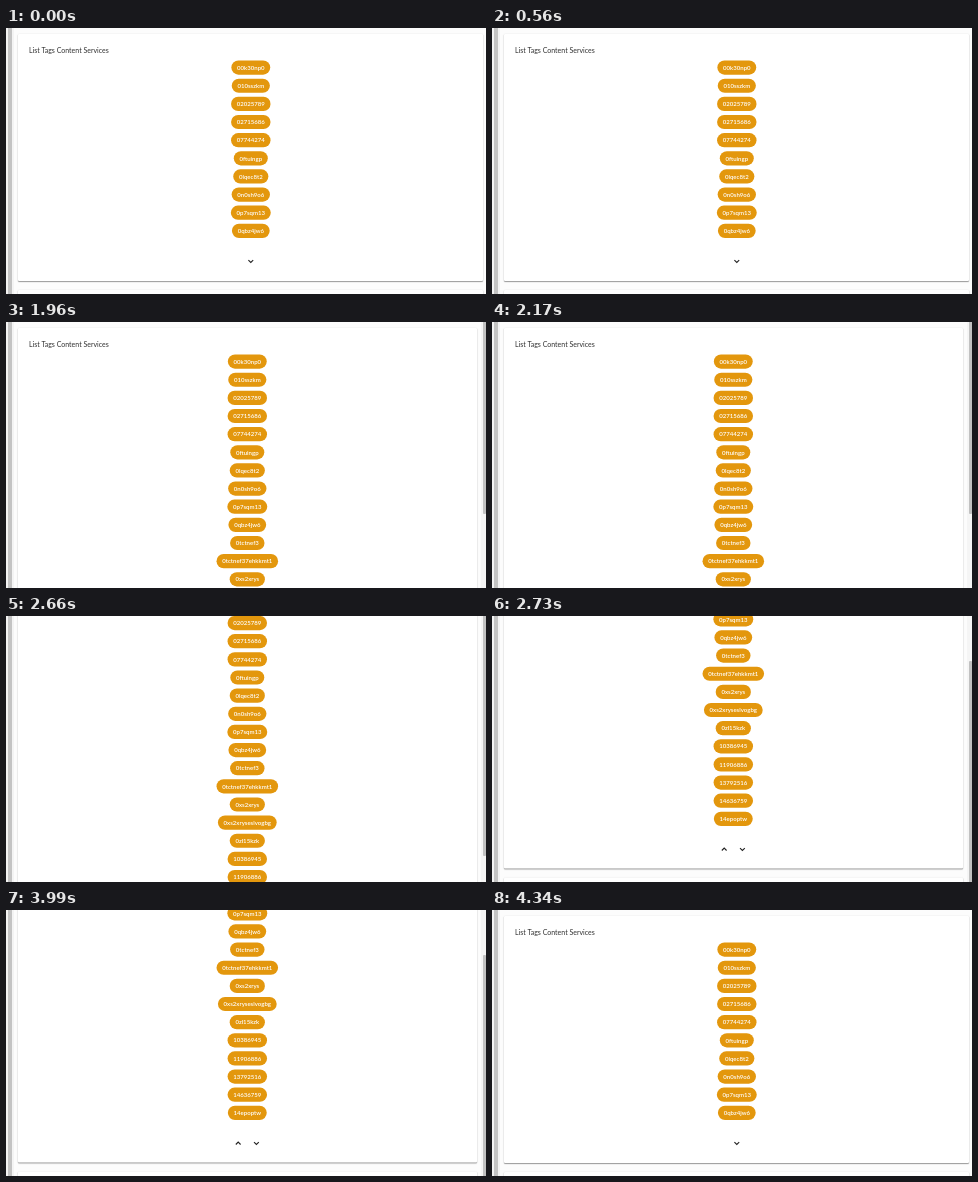
These frames come from a looping animation (480 px wide and 266 px high, 6.09 s). An HTML page:

```html
<!DOCTYPE html>
<html lang="en">
<head>
<meta charset="utf-8">
<title>Tag list</title>
<style>
  html, body { margin: 0; width: 100%; height: 100%; overflow: hidden; background: #fcfcfc; }
  #stage { position: relative; width: 480px; height: 266px; overflow: hidden; }
  #stage div, svg { position: absolute; }
  #page { left: 0; top: 0; width: 480px; height: 266px; }
  .card {
    left: 12px; background: #fff; border-radius: 1px;
    box-shadow: 0 1px 1px rgba(0,0,0,.3), 0 .5px 1.5px rgba(0,0,0,.22);
  }
  #rail { left: 0; top: 0; width: 8px; height: 266px; background: #f3f3f3; }
  #rail div { left: 2px; width: 4px; height: 266px; background: #c3c3c3; }
  #track { left: 475px; top: 0; width: 5px; height: 266px; background: #f5f5f5; }
  #thumb { left: 2px; width: 3px; height: 274px; background: #c1c1c1; border-radius: 1px; }
  svg { left: 0; top: 0; overflow: visible; }
  text { font-family: Lato, "Open Sans", sans-serif; }
  .title { font-size: 7px; fill: #303030; }
  .chip text { font-size: 6.05px; font-weight: 600; fill: #fff; text-anchor: middle; }
  .chip rect { fill: #e3970d; }
  .arrow { fill: none; stroke-width: 1.1; }
</style>
</head>
<body>
<div id="stage">
  <div id="page">
    <div class="card" id="list"></div>
    <div class="card" id="next"></div>
    <svg id="art" width="480" height="266">
      <text class="title" x="23" y="24.6">List Tags Content Services</text>
      <g id="chips"></g>
      <g id="pager">
        <circle id="ripple" cy="232.8"/>
        <path id="up" class="arrow" d="M-2.4 1.2 L0 -1.2 L2.4 1.2"/>
        <path id="down" class="arrow" d="M-2.4 -1.2 L0 1.2 L2.4 -1.2"/>
      </g>
    </svg>
  </div>
  <div id="rail"><div></div></div>
  <div id="track"><div id="thumb"></div></div>
</div>
<script>
const LOOP = 6090, PITCH = 18.14, PAGE = 10;
const tags = ("00k30np0 010sszkm 02025789 02715686 07744274 0ftuingp 0lqec8t2 0n0sh9o6 " +
  "0p7sqm13 0qbz4jw6 0tctnef3 0tctnef37ehkkmt1 0xs2xrys 0xs2xryseslvogbg 0zl15kzk " +
  "10386945 11906886 13792516 14636759 14epoptw").split(" ");

const first = { pages: 1, scroll: 0, up: false, ink: "#222", ripple: 0 };
const busy = { ...first, up: true, ink: "#999" };
const both = { ...first, pages: 2, up: true };
const steps = [
  { ...first, t: 0 },
  { ...first, t: 1470, ripple: 5, tone: "#efefef" },
  { ...busy, t: 1540, ripple: 8, tone: "#e8e8e8" },
  { ...busy, t: 1610, ripple: 9.2, tone: "#e1e1e1" },
  { ...both, t: 1960 },
  { ...both, t: 2660, scroll: 68.8 },
  { ...both, t: 2730, scroll: PAGE * PITCH },
  { ...first, t: 4200 }
];

const $ = id => document.getElementById(id);
const set = (el, attrs) => { for (const k in attrs) el.setAttribute(k, attrs[k]); return el; };
const make = (name, parent, attrs) =>
  parent.appendChild(set(document.createElementNS("http://www.w3.org/2000/svg", name), attrs));

const chips = tags.map((tag, i) => {
  const g = make("g", $("chips"), { class: "chip" });
  const y = 39.6 + i * PITCH;
  const box = make("rect", g, { y: y - 7.1, height: 14.2, rx: 7.1 });
  const label = make("text", g, { x: 0, y: y + 2.2 });
  label.textContent = tag;
  const w = label.getComputedTextLength() + 11.4;
  set(box, { x: -w / 2, width: w });
  return g;
});

function place(el, top, width, height) {
  Object.assign(el.style, { top: top + "px", width: width + "px", height: height + "px" });
}

function show(s) {
  const long = s.pages > 1;
  const extra = (s.pages - 1) * PAGE * PITCH;
  const mid = long ? 241.3 : 244.8;
  const width = long ? 459 : 465;
  const gap = s.up ? 9.1 : 0;

  place($("list"), 6, width, 246.5 + extra);
  place($("next"), 262 + extra, width, 40);
  $("page").style.transform = `translateY(${-s.scroll}px)`;
  set($("chips"), { transform: `translate(${mid} 0)` });
  chips.forEach((c, i) => c.style.display = i < s.pages * PAGE ? "" : "none");

  set($("pager"), { transform: `translate(${mid} ${extra})` });
  set($("up"), { transform: `translate(${-gap} 233.3)`, stroke: s.ink });
  set($("down"), { transform: `translate(${gap} 233.3)`, stroke: s.ink });
  $("up").style.display = s.up ? "" : "none";
  set($("ripple"), { cx: gap, r: s.ripple, fill: s.tone || "none" });

  $("track").style.display = long ? "" : "none";
  $("thumb").style.top = -82 + s.scroll * 0.7 + "px";
}

let current;
function tick() {
  const t = performance.now() % LOOP;
  const s = steps.filter(k => k.t <= t).pop();
  if (s !== current) show(current = s);
  requestAnimationFrame(tick);
}
tick();
</script>
</body>
</html>
```
